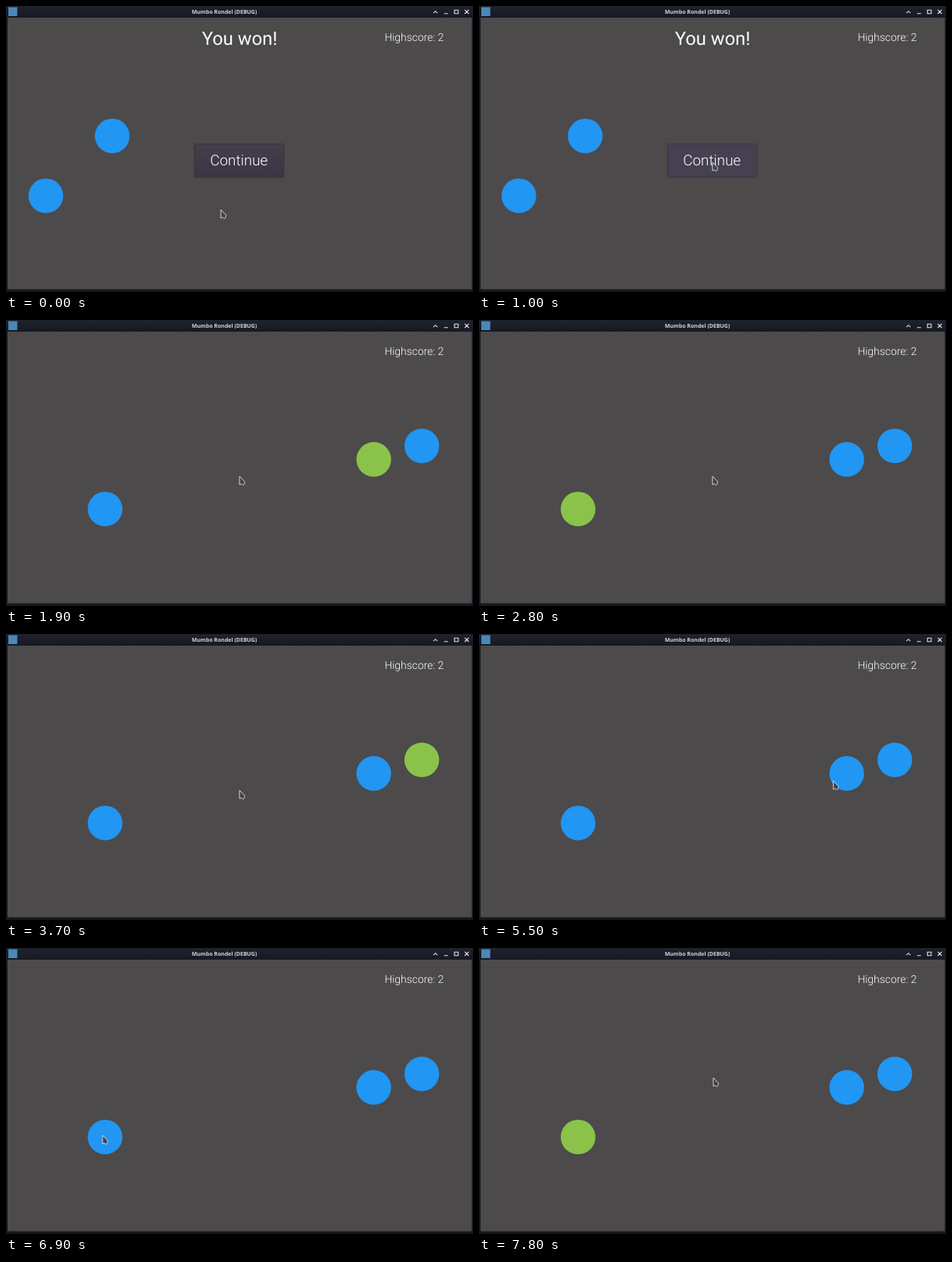
These frames come from a looping animation (600 px wide and 368 px high, 8000 ms). An HTML page:

```html
<!DOCTYPE html>
<html lang="en">
<head>
<meta charset="utf-8">
<title>Memory game</title>
<style>
  html, body { margin: 0; width: 100%; height: 100%; overflow: hidden; background: #15151d; }
  svg { display: block; width: 600px; height: 368px; }
  text { fill: #fff; font-family: Roboto, sans-serif; text-rendering: geometricPrecision; }
  .light { font-weight: 300; }
  .title { font: 700 7px "Noto Sans", sans-serif; fill: #d3d5d9; }
  .controls { fill: none; stroke: #e2e4e8; stroke-width: 1.1; }
  #won circle { fill: #2196f3; }
  #button { fill: url(#face); stroke: #37343d; }
  #button.hover { fill: #454150; stroke: #3d3a46; }
  #button.pressed { fill: #35323d; }
</style>
</head>
<body>
<svg viewBox="0 0 600 368">
  <defs>
    <linearGradient id="bar" x2="0" y2="1">
      <stop stop-color="#20232e"/><stop offset="1" stop-color="#161922"/>
    </linearGradient>
    <linearGradient id="face" x2="0" y2="1">
      <stop stop-color="#433f4b"/><stop offset="1" stop-color="#393543"/>
    </linearGradient>
  </defs>
  <rect width="600" height="368" fill="#17171f"/>
  <rect width="600" height="15" fill="url(#bar)"/>
  <rect x="2" y="15" width="596.5" height="349.5" fill="#4c4a4b"/>
  <rect x="3" y="1.5" width="11.5" height="11.5" fill="#4b88b8"/>
  <text class="title" x="280.5" y="9.8" text-anchor="middle">Mumbo Rondel (DEBUG)</text>
  <path class="controls" d="M549.2 9.2 551.7 6.7 554.2 9.2M562.8 9.7H567.8M576.2 5.2H581V9.8H576.2ZM589.4 4.8 594.6 10M594.6 4.8 589.4 10"/>
  <text class="light" x="486.4" y="45.3" font-size="13.9">Highscore: 2</text>

  <g id="won">
    <text x="300.1" y="50" font-size="23.8" text-anchor="middle">You won!</text>
    <circle cx="136.5" cy="167.2" r="22.3"/>
    <circle cx="51.2" cy="244.2" r="22.3"/>
    <rect x="241" y="176.5" width="117" height="45" rx="2.5" fill="#444147"/>
    <rect id="button" x="242.5" y="178" width="114" height="42" rx="1.5"/>
    <text class="light" x="299.3" y="205" font-size="18.9" text-anchor="middle">Continue</text>
  </g>
  <g id="round">
    <circle cx="472.5" cy="179.4" r="22.3"/>
    <circle cx="127.3" cy="243.2" r="22.3"/>
    <circle cx="534.2" cy="162" r="22.3"/>
  </g>
  <path id="cursor" d="M0 0V10.8L2.6 9.8 4.2 11.6 5.7 10.7 6.8 7.2Z" fill="#434144" stroke="#eceaec" stroke-width=".85" stroke-linejoin="round"/>
</svg>
<script>
  const LOOP = 8000, TICK = 100;
  const PRESS = 1500, PLAY = 1600, DEMO = 1700, BEAT = 1000;
  const CLICK_FIRST = 6000, CLICK_SECOND = 7400, FLASH = 900;
  const BLUE = "#2196f3", GREEN = "#8bc34a";
  const $ = id => document.getElementById(id);
  const dots = [...$("round").children];

  const home = { x: 276, y: 262 };
  const moves = [
    { start: 400, span: 600, x: 300, y: 201 },
    { start: 5000, span: 700, x: 469, y: 188 },
    { start: 6400, span: 135, x: 124, y: 241 },
    { start: 7700, span: 100, x: 301, y: 167 }
  ];

  const clamp = v => Math.min(1, Math.max(0, v));
  const easeOut = k => 1 - (1 - k) ** 2;
  const mix = (a, b, k) => a + (b - a) * k;
  const within = (t, start, span) => t >= start && t < start + span;

  function pointerAt(t) {
    return moves.reduce((from, to) => {
      const k = easeOut(clamp((t - to.start) / to.span));
      return { x: mix(from.x, to.x, k), y: mix(from.y, to.y, k) };
    }, home);
  }

  // The demo lights each dot in turn, then the player repeats the order.
  function litDot(t) {
    if (within(t, DEMO, BEAT * dots.length)) return Math.floor((t - DEMO) / BEAT);
    return [CLICK_FIRST, CLICK_SECOND].findIndex(click => within(t, click, FLASH));
  }

  function show(el, on) {
    el.setAttribute("visibility", on ? "visible" : "hidden");
  }

  function draw(time) {
    const t = Math.floor(time % LOOP / TICK) * TICK;
    const { x, y } = pointerAt(t);
    const lit = litDot(t);
    show($("won"), t < PLAY);
    show($("round"), t >= PLAY);
    $("button").setAttribute("class", t >= PRESS ? "pressed" : y < 221 ? "hover" : "");
    dots.forEach((dot, i) => dot.setAttribute("fill", i === lit ? GREEN : BLUE));
    $("cursor").setAttribute("transform", `translate(${x} ${y})`);
  }

  const start = performance.now();
  function frame() {
    draw(performance.now() - start);
    requestAnimationFrame(frame);
  }
  frame();
</script>
</body>
</html>
```
